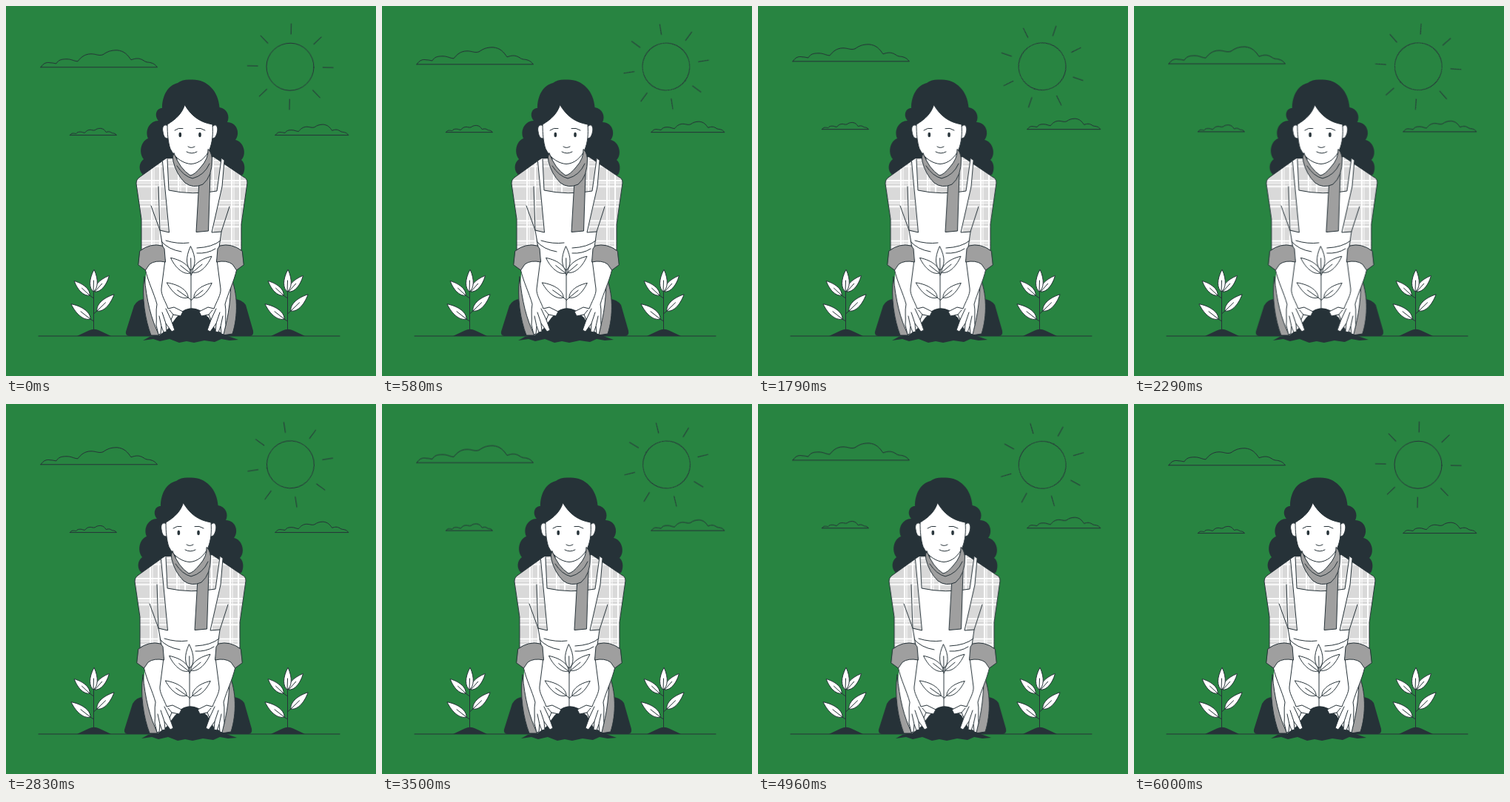
Write an HTML page that moves like this. It is 500 by 500 pixels and loops after 6.04 s.

```html
<!DOCTYPE html>
<html lang="en">
<head>
<meta charset="utf-8">
<title>Planting seedlings</title>
<style>
html, body { margin: 0; width: 100%; height: 100%; overflow: hidden; background: #288441; }
svg { display: block; width: 100%; height: 100%; }
.line { fill: none; stroke: #263238; stroke-width: 1; stroke-linecap: round; stroke-linejoin: round; }
.white { fill: #fff; }
.gray { fill: #9f9f9f; }
.plaid { fill: url(#plaid); }
.dark { fill: #263238; stroke: none; }
.thin { vector-effect: non-scaling-stroke; }

/* 6 s of motion in a 6.04 s loop, the sun stepping at 24 frames per second */
.sun { transform-origin: 384.2px 82px; animation: spin 6040ms steps(145) -5ms infinite; }
.sky { animation: float 6040ms linear -15ms infinite; }
.gardener { animation: sway 6040ms linear -15ms infinite; }
@keyframes spin {
  from { transform: rotate(1.25deg); }
  to { transform: rotate(363.75deg); }
}
@keyframes float {
  0%, 49.669%, 99.338%, 100% { transform: translateY(0); }
  24.834%, 74.503% { transform: translateY(-10px); }
}
@keyframes sway {
  0%, 99.338%, 100% { transform: translateX(0); }
  9.934%, 89.404% { transform: translateX(-1px); }
  19.868%, 79.47% { transform: translateX(2px); }
  29.801%, 49.669%, 69.536% { transform: translateX(-4px); }
  39.735%, 59.603% { transform: translateX(4px); }
}
</style>
</head>
<body>
<svg viewBox="0 0 500 500">
  <defs>
    <pattern id="plaid" x="194" y="233" width="36" height="27.2" patternUnits="userSpaceOnUse">
      <path fill="#d9d9d9" d="M0 0H36V28H0z"/>
      <path stroke="#fff" stroke-width="2" d="M3 0V28M14 0V28M0 3H36M0 11H36"/>
      <path stroke="#fff" stroke-width="1" d="M6 0V28M0 6H36"/>
    </pattern>
    <path id="leaf" class="thin" d="M0 0C-6-4-7-16 0-30C7-16 6-4 0 0V-15"/>
    <path id="cloud" class="thin" d="M0 0H157.5C155-3 153-5 149-6C146-7 143-6 139-9C133-13 128-12 122-10C117-17 113-22 103-23C94-23 90-21 84-17C78-15 75-18 68-18C59-18 54-13 50-8C45-8 42-11 35-11C28-11 24-10 21-5C18-5 17-6 13-6C8-7 4-6 0 0z"/>
    <path id="ray" d="M384.2 24V38"/>
    <g id="seedling">
      <path d="M118.5 438V386M113 391L118.5 395M123 412L118.500 416M114 423L118.5 426"/>
      <g class="white">
        <use href="#leaf" transform="translate(113 391)rotate(-47)scale(.95)"/>
        <use href="#leaf" transform="translate(120 386)rotate(42)scale(.97)"/>
        <use href="#leaf" transform="translate(118 386)rotate(2)"/>
        <use href="#leaf" transform="translate(123 412)rotate(46)scale(1.07)"/>
        <use href="#leaf" transform="translate(114 423)rotate(-52)scale(1.1)"/>
      </g>
      <path class="dark" d="M96 446L112 438.500Q119 435 126 438.500L142 446z"/>
    </g>
    <g id="arm">
      <path class="white" d="M190 338L188 355C192 373 200 388 204 403C202 412 204 422 203 431L206 444L209 443L210 433L213 441L217 440L216 429L224 440L228 438L223 424L226 417L236 419L239 413L227 407L219 409C216 400 209 390 210 382L215 343L211 335"/>
      <path d="M210 433L207 419M216 429L211 414M223 424L216 409M226 417L221 411"/>
      <path class="gray" d="M181 331Q195 320 211 324L214 328L215.500 346Q202 343 194 349L188.500 357L179 350z"/>
    </g>
  </defs>

  <g class="line sun">
    <circle cx="384" cy="82.2" r="32"/>
    <use href="#ray"/>
    <use href="#ray" transform="rotate(45 384.2 82)"/>
    <use href="#ray" transform="rotate(90 384.2 82)"/>
    <use href="#ray" transform="rotate(135 384.2 82)"/>
    <use href="#ray" transform="rotate(180 384.2 82)"/>
    <use href="#ray" transform="rotate(225 384.2 82)"/>
    <use href="#ray" transform="rotate(270 384.2 82)"/>
    <use href="#ray" transform="rotate(315 384.2 82)"/>
  </g>

  <g class="line sky">
    <use href="#cloud" transform="translate(47 82.8)"/>
    <use href="#cloud" transform="translate(86.5 174.6)scale(.4)"/>
    <use href="#cloud" transform="translate(364 174.6)scale(.628)"/>
  </g>

  <g class="line">
    <path d="M44 446H451"/>
    <use href="#seedling"/>
    <use href="#seedling" x="262"/>
  </g>

  <g class="line gardener">
    <!-- hair -->
    <path class="dark" d="M211 138C211 121 219 107 232 104C237 100 243 99 251 99.500C272 99 287 115 288.500 137C299 139 303 149 299 157C312 157 317 172 310 181C321 183 326 200 318 208C324 213 323 223 320 228L250 245L185 228C179 223 179 212 186 207C179 198 182 183 192 179C187 167 195 155 206 155C200 148 203 138 211 138z"/>

    <!-- boots -->
    <path class="dark" d="M207 446H166Q161 445 162 440L173 405Q178 396 188 396zM293 446H330Q335 445 334 439L324 404Q318 396 308 396z"/>

    <!-- shirt and apron -->
    <path class="plaid" d="M216 206L181 231Q176 234 176 240L183 288L183 330H318L318 295L326 239Q326 233 321 231L281 204z"/>
    <path class="white" stroke="none" d="M211 210L218 206L220 249Q252 256 285 250L291 206L295 209L292 244L278 306L291 305L288 328L300 358L310 390L296 445H204L187 390L190 350L213 328L208 304L220.500 306z"/>
    <path d="M211.5 210L220.500 306L208 303M218 207L220 249Q252 256 285 250L291 207M295 209L292 244L278 306L291 305M206 244L208 303L212 326M196 270L208 303M302 271L291 305L288 326M216 317Q232 322 247 320M210 318Q219 329 237 332M290 317Q279 326 258 327M283 328Q272 335 258 334"/>
    <path class="gray" d="M187 366C183 394 188 424 196 445H207C196 423 190 398 187 366zM304 366C313 388 314 418 306 443L293 445C302 418 304 389 304 366z"/>

    <!-- planted sprout -->
    <path d="M250 412V357M249 361L250 363M252 360L250 364M246 394L250 397M254 394L250 398"/>
    <g class="white">
      <use href="#leaf" transform="translate(252 360)rotate(50)scale(1.13)"/>
      <use href="#leaf" transform="translate(249 361)rotate(-52)scale(1.12)"/>
      <use href="#leaf" transform="translate(250 357)rotate(-1)scale(1.08)"/>
      <use href="#leaf" transform="translate(246 394)rotate(-55)scale(1.17)"/>
      <use href="#leaf" transform="translate(254 394)rotate(51)scale(1.04)"/>
    </g>
    <path class="dark" d="M185 452L194 447L207 445L219 436L230 421L239 412Q250 405 262 411L274 421L283 437L297 445L314 451L302 452L291 450L282 454L268 452L254 455L244 453L234 455L221 450L208 453L199 450z"/>

    <use href="#arm"/>
    <use href="#arm" transform="translate(500)scale(-1 1)"/>

    <!-- head -->
    <path class="white" d="M231 195V215L250 234L273 214V190z"/>
    <path class="white" d="M220 163C215 158 210 162 212 170C213 177 216 181 220 178zM279 163C283 158 287 162 285.500 170C284 177 281 181 277 178z"/>
    <path class="white" d="M241.500 133.500C238 145 230 153 218 160C218 173 219 184 222 193C229 207 241 213 250 213.5C261 213 270 205 275 194C279 184 280 173 279 160C261 157 250 148 241.500 133.500z"/>
    <ellipse class="dark" cx="235.3" cy="174" rx="1.800" ry="3.200"/>
    <ellipse class="dark" cx="262" cy="174" rx="1.800" ry="3.200"/>
    <path d="M228 168Q233 164 239 165.5M257 165.5Q263 164 269 168M246 190Q250 193 255 190M244 197Q251 201 258 197"/>

    <!-- scarf -->
    <path class="gray" d="M261 236L257 305.500L273.500 304L276 226z"/>
    <path class="gray" d="M227 199Q224 204 226 210Q230 227 242 239Q253 247 266 241Q279 230 278.500 206Q277 196 273 193.500Q274 206 263 218Q255 228 249 229Q235 220 227 199z"/>
    <path d="M231 216Q240 230 252 233Q268 229 275 213"/>
  </g>
</svg>
</body>
</html>
```
